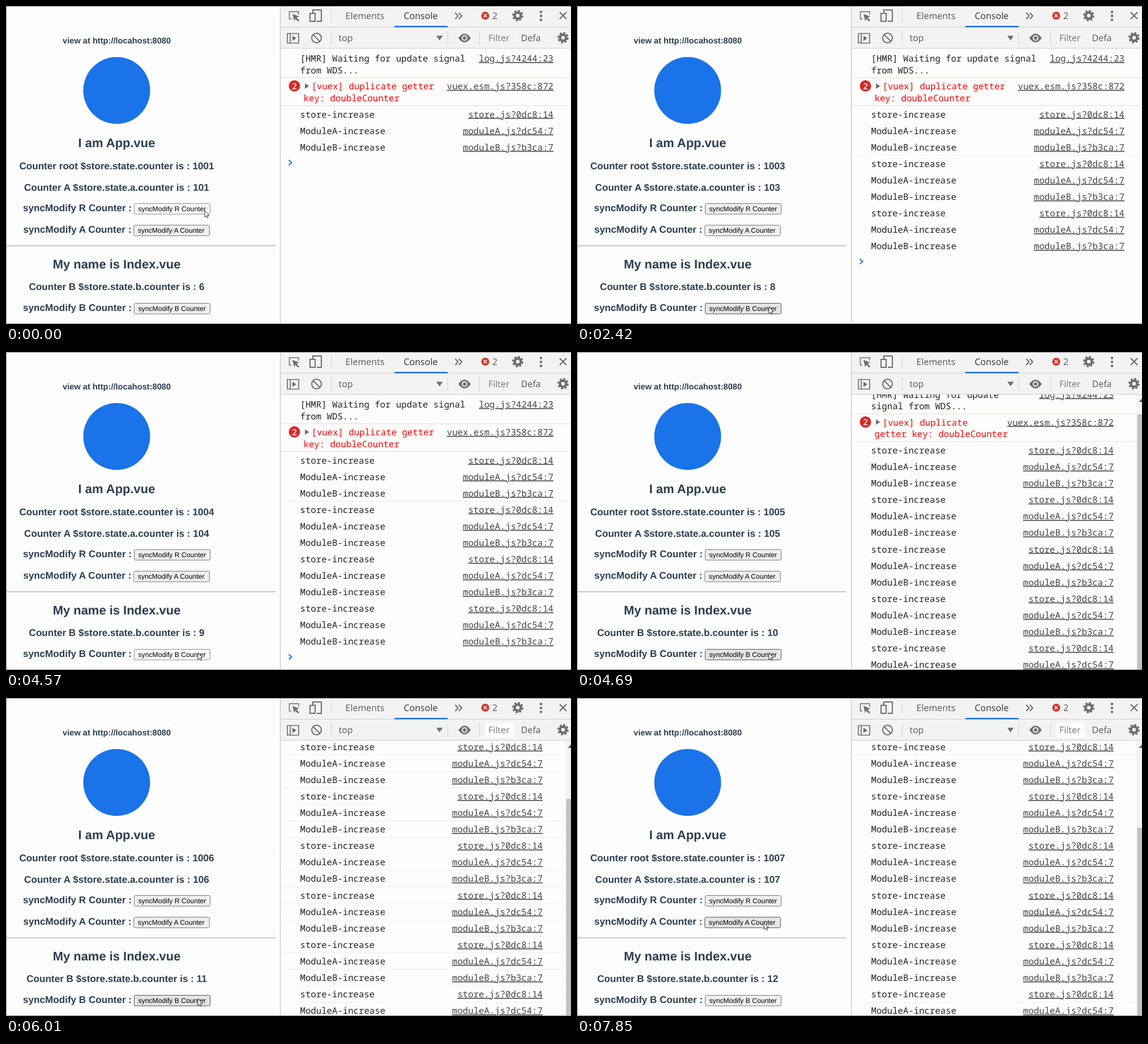
An HTML page that plays this animation: 998 px wide and 561 px high, repeating every 8000 ms.

```html
<!DOCTYPE html>
<html lang="en">
<head>
<meta charset="utf-8">
<title>Store counters</title>
<style>
html, body { margin: 0; width: 100%; height: 100%; overflow: hidden; background: #fdfdfd; }
svg { display: block; width: 998px; height: 561px; }
text { white-space: pre; text-rendering: geometricPrecision; }
.page { font: bold 17.13px "Liberation Sans", Arial, sans-serif; fill: #2c3e50; }
.mid { text-anchor: middle; }
.big { font-size: 21.96px; }
.small { font-size: 14.64px; }
.btn { font: 12.2px "Liberation Sans", Arial, sans-serif; fill: #000; }
.ui { font: 16px "Open Sans", "Noto Sans", sans-serif; fill: #5a5a5a; }
.mono { font: 15.7px "Noto Sans Mono", "DejaVu Sans Mono", monospace; fill: #222; }
.link { fill: #444; text-anchor: end; text-decoration: underline; text-decoration-thickness: 1px; }
.error { fill: #f00; }
.icon { fill: none; stroke: #6e6e6e; stroke-width: 2; }
.solid { fill: #6e6e6e; }
.rule { stroke: #ccc; }
</style>
</head>
<body>
<svg viewBox="0 0 998 561">
  <defs>
    <clipPath id="body"><rect x="485" y="75" width="513" height="485"/></clipPath>
    <g id="gear" fill="none" stroke="#6e6e6e">
      <circle r="5.4" stroke-width="4.4"/>
      <circle r="8.4" stroke-width="3" stroke-dasharray="3.7 2.9"/>
    </g>
  </defs>
  <rect width="998" height="561" fill="#fdfdfd"/>

  <g class="page">
    <text class="mid small" x="195.6" y="66">view at http://locahost:8080</text>
    <circle cx="195.5" cy="149" r="59" fill="#1a73e8"/>
    <text class="mid big" x="195.5" y="249">I am App.vue</text>
    <text class="mid" x="195.5" y="288" id="root"></text>
    <text class="mid" x="195.5" y="325.5" id="countA"></text>
    <path d="M1 423H476" stroke="#b8b8b8" stroke-width="1.6"/>
    <text class="mid big" x="195.5" y="462.5">My name is Index.vue</text>
    <text class="mid" x="195.5" y="501" id="countB"></text>
  </g>
  <g id="buttons"></g>

  <g clip-path="url(#body)"><g id="log"></g></g>
  <g id="scrollbar">
    <rect x="988" y="75" width="10" height="485" fill="#f3f3f3"/>
    <path d="M992.5 88l5.5-6v6z" fill="#505050"/>
    <rect id="thumb" x="989.5" width="8.5" fill="#c1c1c1"/>
  </g>

  <rect x="485" y="1" width="513" height="74" fill="#f3f3f3"/>
  <path class="rule" d="M485 37.5H998M485 74.5H998M574.5 6V28M574.5 45V68M780.5 45V68M836.5 45V68"/>
  <rect x="686" y="35" width="94" height="2.5" fill="#1a73e8"/>
  <rect id="filterBox" x="847" y="43" width="50" height="27" fill="#fff"/>
  <g class="ui">
    <text x="599.5" y="23">Elements</text>
    <text x="702.5" y="23" fill="#333" style="fill:#333">Console</text>
    <text x="859" y="23">2</text>
    <text x="587.5" y="62">top</text>
    <text x="852" y="62" style="fill:#777">Filter</text>
    <text x="909.5" y="62">Defa</text>
  </g>
  <g class="icon">
    <path stroke-width="1.5" d="M504 23H500.500V10H517V15"/>
    <path class="solid" stroke="none" d="M506 14l12 4.500-4.800 2 4.800 5-2 2-5-5-2 4z"/>
    <path d="M542 12V7H557V27H549"/>
    <rect x="537" y="13" width="9" height="14"/>
    <path d="M793.500 12l5 5.500-5 5.500M800 12l5 5.500-5 5.500"/>
    <path d="M978 11l12 12M990 11l-12 12" stroke-width="2.200"/>
    <path d="M497 48.500H517V65.500H497ZM502 48V66" stroke-width="1.700"/>
    <path class="solid" stroke="none" d="M506 52.500v9l7-4.500z"/>
    <circle cx="548.500" cy="56.500" r="8.500"/>
    <path d="M542.500 50.500l12 12"/>
    <path class="solid" stroke="none" d="M760 52.500h11.500l-5.750 8z"/>
    <path class="solid" stroke="none" d="M799 56.500Q810 41 821 56.500Q810 72 799 56.500Z"/>
    <circle cx="810" cy="56.500" r="4" fill="#6e6e6e" stroke="#f3f3f3"/>
  </g>
  <g class="solid">
    <circle cx="945" cy="10.500" r="2.300"/><circle cx="945" cy="17.500" r="2.300"/><circle cx="945" cy="24.500" r="2.300"/>
  </g>
  <circle cx="846.500" cy="17" r="7" fill="#d93025"/>
  <path d="M843.500 14l6 6M849.500 14l-6 6" stroke="#fff" stroke-width="1.600"/>
  <use href="#gear" x="904" y="17"/>
  <use href="#gear" x="984" y="56"/>

  <path d="M484.500 1V560" stroke="#bdbdbd"/>
  <path d="M998 .5H.5V560.500H998" fill="none" stroke="#858585"/>
  <path id="cursor" d="M0 0V11.500L2.700 9 4.400 13 6.200 12.200 4.500 8.300H8Z" fill="#fff" stroke="#222" stroke-width=".9"/>
</svg>
<script>
const LOOP = 8000, ROW = 29.09;
const $ = id => document.getElementById(id);

// [ms, clicks so far, active button, pressed, cursor x, cursor y]
const STEPS = [
  [0, 1, "R", 1, 351, 361],
  [150, 2, "R", 0, 351, 361],
  [890, 2, "R", 1, 351, 361],
  [1040, 3, "R", 0, 351, 361],
  [1880, 3, "", 0, 374, 400],
  [2000, 3, "", 0, 391, 465],
  [2120, 3, "B", 0, 342, 530],
  [2280, 3, "B", 0, 339, 532],
  [2420, 3, "B", 0, 339, 531],
  [3150, 3, "B", 1, 339, 531],
  [3290, 4, "B", 0, 339, 531],
  [4570, 4, "B", 1, 339, 531],
  [4690, 5, "B", 0, 339, 531],
  [5770, 5, "B", 1, 339, 531],
  [5890, 6, "B", 0, 339, 531],
  [6130, 6, "", 0, 338, 500],
  [6250, 6, "", 0, 335, 460],
  [6400, 6, "", 0, 333, 432],
  [6520, 6, "", 0, 331, 409],
  [6670, 6, "A", 0, 330, 399],
  [6790, 6, "A", 0, 330, 395.5],
  [7100, 6, "A", 1, 330, 395.5],
  [7260, 7, "A", 0, 330, 395.5],
  [7850, 7, "A", 0, 330.5, 396.5]
];
const BUTTONS = [
  { key: "R", x: 226.5, y: 348.5, w: 134, label: 30, base: 362 },
  { key: "A", x: 225.8, y: 386.7, w: 133.6, label: 30.6, base: 400 },
  { key: "B", x: 226.5, y: 524.5, w: 134, label: 30, base: 538 }
];
const SOURCES = [
  ["store", "store.js?0dc8:14"],
  ["ModuleA", "moduleA.js?dc54:7"],
  ["ModuleB", "moduleB.js?b3ca:7"]
];
const THUMB_TOP = { 5: 110, 6: 178, 7: 229 };

const text = (x, y, cls, str) => `<text x="${x}" y="${y}" class="${cls}">${str}</text>`;
const line = (y, color, end) => `<path d="M485 ${y}H${end}" stroke="${color}"/>`;

function drawButtons(active, pressed) {
  $("buttons").innerHTML = BUTTONS.map(b => {
    const on = b.key === active;
    const fill = !on ? "#efefef" : pressed ? "#f9f9f9" : "#e5e5e5";
    const edge = !on ? "#767676" : pressed ? "#8d8d8d" : "#4f4f4f";
    const name = `syncModify ${b.key} Counter`;
    return text(b.label, b.base, "page", name + " :") +
      `<rect x="${b.x}" y="${b.y}" width="${b.w}" height="18.6" rx="2" fill="${fill}" stroke="${edge}"/>` +
      text(b.x + 7, b.y + 13.4, "btn", name);
  }).join("");
}

function hasRule(clicks, row) {
  if (clicks < 5) return clicks > 1 && row === 2;
  if (clicks === 6) return true;
  return clicks === 7 && (row === 3 || row === 18);
}

function drawLog(n) {
  const narrow = n > 4;
  const right = narrow ? 948 : 967, edge = narrow ? 988 : 998;
  const scroll = narrow ? 17.5 + (n - 5) * 3 * ROW : 0;
  const intro = narrow
    ? ["[HMR] Waiting for update", "signal from WDS...", "[vuex] duplicate", "getter key: doubleCounter"]
    : ["[HMR] Waiting for update signal", "from WDS...", "[vuex] duplicate getter", "key: doubleCounter"];
  let out = text(519.5, 98, "mono", intro[0]) + text(519.5, 118.5, "mono", intro[1]) +
    text(right, 98, "mono link", "log.js?4244:23") +
    line(126.5, "#ffd3d3", edge) + line(175.5, "#ffd3d3", edge) +
    `<circle cx="509.500" cy="141" r="10" fill="#dc2626"/>` +
    `<text x="509.500" y="146.500" class="ui mid" style="font-size:15px;font-weight:600;fill:#fff">2</text>` +
    `<path d="M528 136.500v9.500l7.500-4.750z" fill="#6e6e6e"/>` +
    text(539.5, 147, "mono error", intro[2]) + text(525.5, 167.5, "mono error", intro[3]) +
    text(right, 147, "mono link", "vuex.esm.js?358c:872");
  for (let i = 0; i < n * 3; i++) {
    const [name, link] = SOURCES[i % 3];
    const y = 196.5 + i * ROW;
    out += text(519.5, y, "mono", name + "-increase") + text(right, y, "mono link", link);
    if (hasRule(n, i)) out += line(y + 8.7, "#eeeeee", edge);
  }
  out += `<path d="M499.500 ${184.5 + n * 3 * ROW}l5 4.500-5 4.500" fill="none" stroke="#1a73e8" stroke-width="2"/>`;
  $("log").innerHTML = out;
  $("log").setAttribute("transform", `translate(0 ${-scroll})`);
  $("scrollbar").style.display = narrow ? "" : "none";
  if (narrow) {
    $("thumb").setAttribute("y", THUMB_TOP[n]);
    $("thumb").setAttribute("height", 560 - THUMB_TOP[n]);
  }
  $("filterBox").style.display = n > 5 ? "" : "none";
}

function drawCounters(n) {
  $("root").textContent = `Counter root $store.state.counter is : ${1000 + n}`;
  $("countA").textContent = `Counter A $store.state.a.counter is : ${100 + n}`;
  $("countB").textContent = `Counter B $store.state.b.counter is : ${5 + n}`;
}

let shown = null;
function frame() {
  const t = performance.now() % LOOP;
  const step = STEPS.findLast(s => s[0] <= t);
  if (step !== shown) {
    const [, n, active, pressed, x, y] = step;
    if (!shown || shown[1] !== n) {
      drawCounters(n);
      drawLog(n);
    }
    drawButtons(active, pressed);
    $("cursor").setAttribute("transform", `translate(${x} ${y})`);
    shown = step;
  }
  requestAnimationFrame(frame);
}
frame();
</script>
</body>
</html>
```
